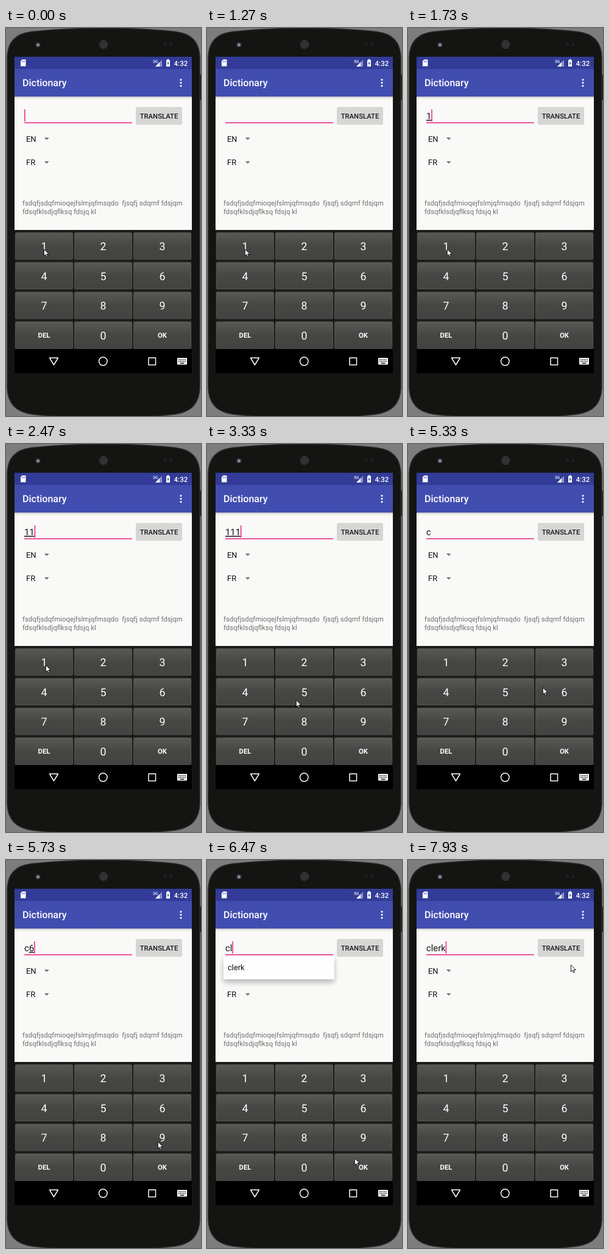
An HTML page for the animation above (8000 ms loop, 320 by 634 pixels).

```html
<!DOCTYPE html>
<html lang="en">
<head>
<meta charset="utf-8">
<title>Dictionary</title>
<style>
html, body { margin: 0; width: 100%; height: 100%; overflow: hidden; background: #7d7d7d; }
svg { display: block; width: 100%; height: 100%; font-family: Roboto, sans-serif; text-rendering: geometricPrecision; }
text { white-space: pre; }
.mid { text-anchor: middle; }
.medium { font-weight: 500; }
</style>
</head>
<body>
<svg viewBox="0 0 320 634">
  <defs>
    <linearGradient id="keyFill" x2="0" y2="1">
      <stop offset="0" stop-color="#595957"/>
      <stop offset=".5" stop-color="#464644"/>
      <stop offset="1" stop-color="#434341"/>
    </linearGradient>
    <linearGradient id="barShadow" x2="0" y2="1">
      <stop offset="0" stop-opacity=".2"/>
      <stop offset="1" stop-opacity="0"/>
    </linearGradient>
    <filter id="blur" x="-20%" y="-80%" width="140%" height="260%"><feGaussianBlur stdDeviation="5"/></filter>
    <pattern id="mesh" width="2.4" height="2.4" patternUnits="userSpaceOnUse">
      <circle cx="1.2" cy="1.2" r=".8" fill="#4c4c4c"/>
    </pattern>
  </defs>

  <!-- Phone body -->
  <rect x="318" y="76" width="2" height="42" fill="#1c1c1c"/>
  <path d="M2 48C3 22 16 9 42 6Q100 0 160 0T278 6C304 9 317 22 318 48V588C317 614 304 627 278 631Q220 638 160 638T42 631C16 627 3 614 2 588z"
    fill="#141412" stroke="#2c2c2a" stroke-width="1.500"/>
  <circle cx="52.500" cy="27.500" r="4.500" fill="#2b2c30"/>
  <circle cx="52.500" cy="27.500" r="2.600" fill="#8388a0"/>
  <circle cx="160" cy="27" r="7.500" fill="#242424"/>
  <circle cx="160" cy="27" r="7" fill="url(#mesh)"/>
  <g fill="#1f1f1f"><circle cx="261" cy="27" r="3"/><circle cx="271" cy="27" r="3"/></g>

  <!-- App -->
  <rect x="14" y="112" width="291" height="218" fill="#f9f9f8"/>
  <rect x="14" y="112" width="291" height="4" fill="url(#barShadow)"/>
  <rect x="14" y="67" width="291" height="45" fill="#414eb0"/>
  <rect x="14" y="47" width="291" height="20" fill="#323c98"/>
  <g fill="#fff">
    <path d="M26.500 51.500h6v11h-8.500v-8.500z"/>
    <path d="M26.500 53.500v2.500m2-2.500v2.500m2-2.500v2.500" stroke="#323c98" stroke-width=".8"/>
    <text x="241" y="57" font-size="6.5" class="medium">3G</text>
    <path d="M256 52v11h-11z" opacity=".45"/>
    <path d="M252 56v7h-7z"/>
    <path d="M263 52.500h1.500v-1.500h3v1.500h1.500v10.500h-6z"/>
    <path d="M266.800 54l-2.500 4h1.500l-.6 3.500 2.600-4.300h-1.600z" fill="#323c98"/>
    <text x="275.500" y="61.500" font-size="11.600" class="medium">4:32</text>
    <text x="27" y="95" font-size="16" class="medium">Dictionary</text>
    <circle cx="287" cy="84.500" r="1.600"/><circle cx="287" cy="89.500" r="1.600"/><circle cx="287" cy="94.500" r="1.600"/>
  </g>
  <rect x="213" y="130" width="76" height="28" rx="2" fill="#000" opacity=".15"/>
  <rect x="213" y="129" width="76" height="28" rx="2" fill="#d6d7d5"/>
  <text x="251" y="147.500" font-size="11.300" class="mid medium" fill="#1a1a1a">TRANSLATE</text>
  <g font-size="12.900" fill="#111">
    <text x="33" y="185.500">EN</text>
    <text x="33" y="224.300">FR</text>
    <path d="M62.800 179h8l-4 4zM62.800 217.800h8l-4 4z" fill="#757575"/>
  </g>
  <g font-size="11.400" fill="#70706f">
    <text x="27" y="290">fsdqfjsdqfmioqejfslmjqfmsqdo  fjsqfj sdqmf fdsjqm</text>
    <text x="27" y="303.500">fdsqfklsdjqflksq fdsjq kl</text>
  </g>
  <rect x="30" y="154" width="177" height="1.600" fill="#ec3285"/>

  <g id="menu">
    <rect x="27" y="162" width="182" height="38" rx="2" opacity=".3" filter="url(#blur)"/>
    <rect x="27" y="156" width="182" height="39" rx="1.500" fill="#fff"/>
    <rect id="ripple" x="27" y="156" width="182" height="39" fill="#ddd"/>
    <text x="34" y="180" font-size="12.900" fill="#000">clerk</text>
  </g>

  <text id="field" x="30" y="149" font-size="14.800" fill="#161616"><tspan id="done"></tspan><tspan id="draft" text-decoration="underline"></tspan></text>
  <rect id="caret" y="133" width="1.600" height="20" fill="#ec3285"/>

  <!-- Keyboard and navigation bar -->
  <rect x="14" y="330" width="291" height="195" fill="#1b1b1a"/>
  <g id="keys"></g>
  <rect x="14" y="525" width="291" height="39" fill="#000"/>
  <g fill="none" stroke="#fff" stroke-width="1.500">
    <path d="M71.500 539h14l-7 11.500z" stroke-linejoin="round"/>
    <circle cx="159.300" cy="544.600" r="6.800"/>
    <rect x="234" y="539" width="11.500" height="11.500"/>
  </g>
  <rect x="281" y="539" width="16" height="11" rx="1" fill="#fff"/>
  <path d="M283 542h12M283 544.700h12" stroke="#000" stroke-width="1.400" stroke-dasharray="1.400 1.200"/>
  <path d="M285.500 547.700h7" stroke="#000" stroke-width="1.400"/>

  <g id="popup">
    <rect width="96" height="64" x=".5" y=".5" rx="3" fill="#ececec" stroke="#9a9a9a"/>
    <text id="popupText" x="48.500" class="mid" fill="#222"></text>
  </g>
  <path id="mouse" d="M.3.5v11l2.600-2.300 1.800 4 1.800-.8-1.800-3.900h3.600z" fill="#fff" stroke="#000" stroke-width=".9"/>
</svg>

<script>
const $ = id => document.getElementById(id);
const LABELS = ['1', '2', '3', '4', '5', '6', '7', '8', '9', 'DEL', '0', 'OK'];
const FPS = 15, LOOP = 8000;

// All times below are in ticks of 1/15 s.
const TEXTS = [[0, '', ''], [25, '', '1'], [36, '', '11'], [46, '', '111'],
  [58, 'c', ''], [83, 'c', '6'], [95, 'cl', ''], [112, 'clerk', '']];
const CARET_OFF = [[3, 11], [19, 25], [33, 36], [43, 46], [54, 58], [66, 73], [80, 83], [91, 95], [102, 109]];
const PRESSES = [[22, 26, '1'], [34, 37, '1'], [44, 47, '1'], [57, 59, 'OK'], [81, 84, '6'], [92, 96, 'OK']];
const MOUSE = [[0, 62, 361], [19, 62, 361], [23, 64, 361], [33, 64, 361], [35, 65, 361], [47, 65, 361],
  [54, 254, 494], [63, 254, 494], [64, 238, 477], [67, 131, 399], [72, 131, 399], [74, 128, 396],
  [77, 128, 396], [81, 252, 398], [84, 252, 402], [86, 249, 460], [89, 245, 490], [90, 245, 490],
  [92, 242, 487], [97, 242, 487], [98, 218, 470], [100, 218, 470], [107, 42, 188], [113, 42, 188],
  [115, 95, 168], [117, 215, 146], [119, 267, 171]];

const keyX = i => 14 + i % 3 * 97;
const keyY = i => 332 + Math.floor(i / 3) * 48.5;

$('keys').innerHTML = LABELS.map((label, i) => {
  const x = keyX(i), y = keyY(i), word = label.length > 1;
  return `<rect x="${x + 1.5}" y="${y + 2.5}" width="94" height="43.500" rx="1.500" fill="url(#keyFill)" stroke="#5c5c5a" stroke-width=".8"/>
    <text x="${x + 48.5}" y="${y + (word ? 28.5 : 31.3)}" class="mid" fill="#fff"
      font-size="${word ? 11.3 : 17.8}" font-weight="${word ? 700 : 400}">${label}</text>`;
}).join('');

const during = (list, t) => list.find(([from, to]) => t >= from && t < to);
const ramp = (t, from, to) => Math.min(1, Math.max(0, (t - from) / (to - from)));

function mouseAt(t) {
  const next = MOUSE.findIndex(k => k[0] > t);
  if (next < 0) return MOUSE.at(-1).slice(1);
  const a = MOUSE[next - 1], b = MOUSE[next], p = ramp(t, a[0], b[0]);
  return [1, 2].map(i => a[i] + (b[i] - a[i]) * p);
}

function draw(t) {
  const [, done, draft] = TEXTS.findLast(k => t >= k[0]);
  $('done').textContent = done;
  $('draft').textContent = draft;
  $('caret').setAttribute('x', 30 + $('field').getComputedTextLength());
  $('caret').style.opacity = during(CARET_OFF, t) ? 0 : 1;

  $('menu').style.opacity = 0.92 * ramp(t, 95, 97) + 0.08 * ramp(t, 97, 98) - ramp(t, 111, 113);
  $('ripple').style.opacity = ramp(t, 107, 110);

  const press = during(PRESSES, t);
  $('popup').style.display = press ? '' : 'none';
  if (press) {
    const label = press[2], i = LABELS.indexOf(label), word = label.length > 1;
    // The preview sits above its key but never leaves the keyboard.
    const y = Math.max(331, keyY(i) - 76);
    $('popup').setAttribute('transform', `translate(${keyX(i)} ${y})`);
    const text = $('popupText');
    text.textContent = label;
    text.setAttribute('y', word ? 37 : 44);
    text.setAttribute('font-size', word ? 11.3 : 32);
    text.setAttribute('font-weight', word ? 700 : 400);
  }
  $('mouse').setAttribute('transform', `translate(${mouseAt(t)})`);
}

const start = performance.now();
function frame() {
  const ms = (performance.now() - start) % LOOP;
  draw(Math.floor(ms * FPS / 1000 + 0.1));
  requestAnimationFrame(frame);
}
frame();
</script>
</body>
</html>
```
